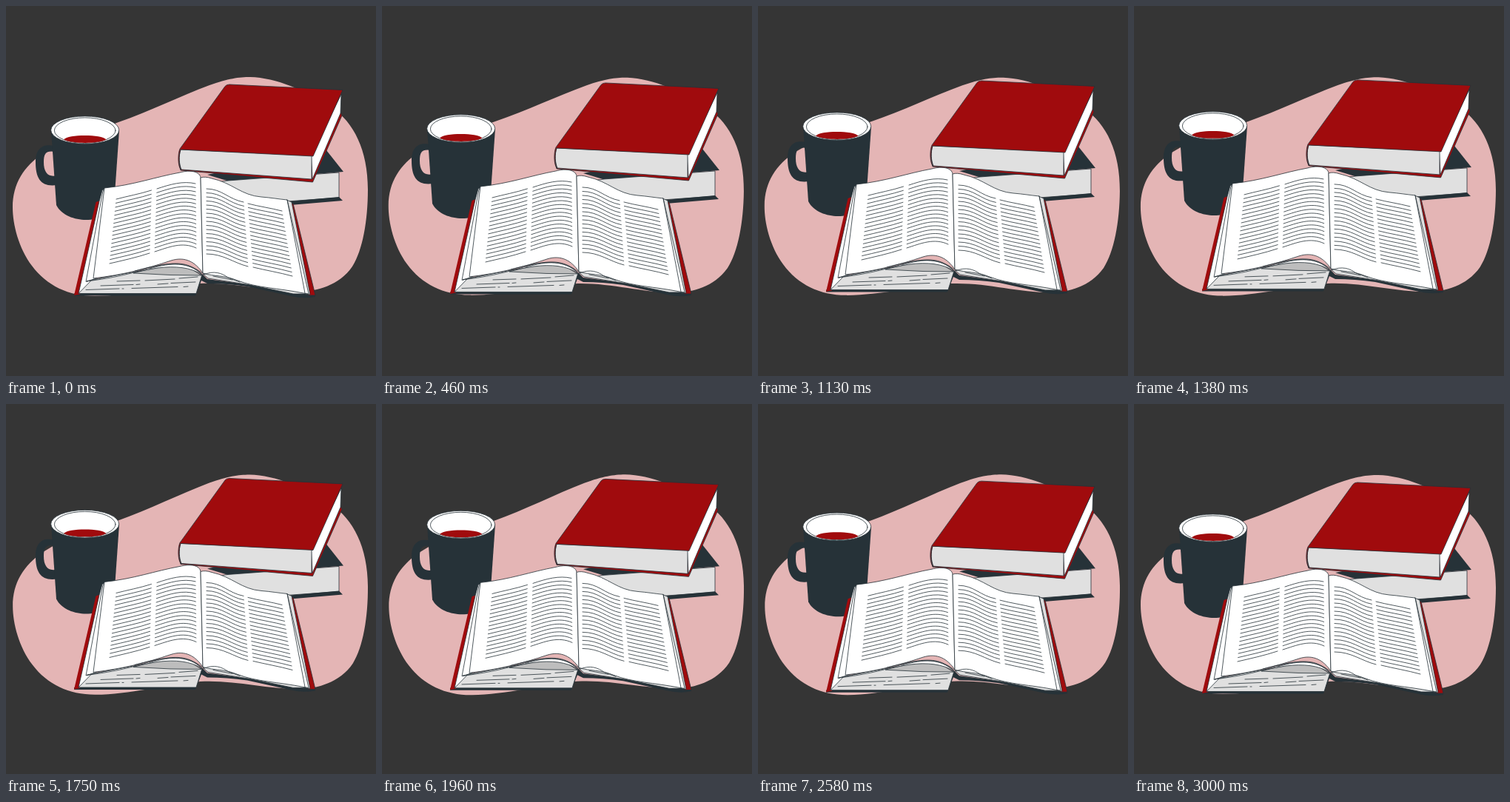
Animation of 500 by 500 pixels, one loop 3.04 s. Source, as an HTML page:

```html
<!DOCTYPE html>
<html lang="en">
<head>
<meta charset="utf-8">
<title>Books and coffee</title>
<style>
  html, body { margin: 0; width: 100%; height: 100%; overflow: hidden; background: #353535; }
  svg { display: block; width: 100vw; height: 100vh; }
  .dark { fill: #263238; }
  .red { fill: #a00b0d; }
  .grey { fill: #e0e0e0; }
  .shade { fill: #bdbdbd; }
  .white { fill: #fff; }
  .edge { stroke: #263238; stroke-width: .8; stroke-linejoin: round; }
  .line { fill: none; stroke: #263238; stroke-width: .8; stroke-linecap: round; }
</style>
</head>
<body>
<svg viewBox="0 0 500 500">
  <path id="blob" fill="#e4b5b5" d="M9 272C9 240 24 217 50 199C80 180 118 170 152 157C195 142 235 122 275 107C300 98 315 96 330 96C365 97 405 114 440 137C470 157 489 195 489 248C489 290 482 330 468 352C450 378 420 385 398 386C350 386 310 373 262 375C215 379 165 392 120 392C85 392 55 378 35 351C17 327 9 295 9 272Z"/>

  <g id="desk">
    <g id="mug">
      <path class="dark" fill-rule="evenodd" d="M67 190C55 186 40 188 40 211C40 234 48 245 69 242V229C57 232 51 225 51 211C51 198 55 195 67 197Z"/>
      <path class="dark" d="M61 168L68 269C75 283 93 289 108 289C125 289 142 281 146 268L153 168Z"/>
      <ellipse class="white edge" cx="106.7" cy="167.7" rx="46" ry="18.8"/>
      <ellipse class="line" cx="106.7" cy="168.2" rx="41.3" ry="17.3"/>
      <path class="red" d="M78 180.5C84 173.3 129 173.3 135.5 180.5C124 186.4 90 186.4 78 180.5Z"/>
    </g>

    <g id="lowerBook">
      <path class="dark" d="M272 228L433 195L456 224L300 236.5Z"/>
      <path class="grey edge" d="M284 238L300 236L450 225V259L380 264L300 268Z"/>
      <path class="dark" d="M372 265L450 258L455 263L384 269Z"/>
    </g>

    <g id="upperBook">
      <path class="red edge" d="M235 196L236 222L414.500 238L454 148L452 143L412 200Z"/>
      <path class="white edge" d="M412.500 203L453 119L452 145L414 234Z"/>
      <path class="grey edge" d="M236 194L413 202V234L237 221C234 214 233 203 236 194Z"/>
      <path class="red edge" d="M302 106L455 113.500L415 203L236 194C233 203 233.500 214 236.500 222C232 216 232 200 235 193L296 108.500Q298 106 302 106Z"/>
    </g>

    <g id="openBook">
      <path class="dark" d="M92 388.500L98 387L257 387L265 362L272 369L325 376L388 386L418 390V393Q402 396 385 392L326 379Q298 375 272 375L264 371L256 391.500L92 391.500Z"/>
      <path class="red" d="M121.500 265L127 263L100 389.500L92 391Z"/>
      <path class="red edge" d="M383 266L388 267L418 391L409 391Z"/>
      <path class="grey edge" d="M379 262L386 265L411 390L404 389Z"/>

      <path class="grey edge" d="M98 388.500L109 371L190 357L265 363L257 388.500Z"/>
      <path class="white edge" d="M126 264L130 249L134 247L118 368L98 388.500Z"/>
      <path class="white edge" d="M131 250L136 246L122 368L108 372.500Z"/>
      <path class="shade edge" d="M172 361C205 352 232 349 247 353L264 364L222 363.500Z"/>
      <path class="white edge" d="M109 372C165 365 184 356 210 350C237 345 251 349 265 363C249 353 229 351 205 354L172 359.500Z"/>
      <path class="white edge" d="M133 246C172 242 202 231 235 225C250 221 262 224 263 232L266 361C256 346 242 338 223 344C190 355 160 363 118 368Z"/>
      <path class="line" d="M174 358C205 350 240 340 265 361M194 355C225 346 246 346 264 362"/>

      <path class="grey edge" d="M266 362L285 359L316 371L404 387V389L388 389L330 377L273 368Z"/>
      <path class="white edge" d="M263 232Q269 230 278 233C306 239 318 256 345 258C358 259 369 261 380 262L409 389L402 388C367 381 339 381 313 371C293 363 283 366 266 361Z"/>
      <path class="line" d="M380 262L404 388M267 363C281 357 292 361 300 367L316 373M280 365L306 370"/>
      <path class="line" d="M150 372L181 371M188 371L228 369M234 368L259 366M128 378L172 376.500M176 376.500L181 376M205 376L219 375M223 374.500L256 373M108 383.500L153 382M157 382L159 382M170 381.500L232 379.500M240 379.500L246 379"/>
      <g id="text" class="line"></g>
    </g>
  </g>
</svg>
<script>
  const ROWS = 17;
  const LOOP = 3040, CYCLE = 3000, FPS = 24;
  const RISE = 6.67, TILT = 1;
  const byId = id => document.getElementById(id);
  const mix = (a, b, k) => a + (b - a) * k;

  // Each column: control points of its first and last line.
  const columns = [
    [[149, 261, 164, 257, 181, 254, 196.5, 249], [140, 348, 157, 344, 176, 340, 194, 334]],
    [[204, 247, 222, 241, 239, 236, 256, 240], [201, 332, 220, 326, 238, 318, 257, 327]],
    [[271, 247, 292, 247, 300, 261, 321, 265], [271, 335, 294, 335, 307, 347, 327, 352]],
    [[327, 267, 342, 271, 358, 273, 373, 277], [334, 353, 350, 357, 369, 360, 387, 365]]
  ];

  let d = "";
  for (const [top, bottom] of columns) {
    for (let row = 0; row < ROWS; row++) {
      const p = top.map((v, i) => mix(v, bottom[i], row / (ROWS - 1)).toFixed(1));
      d += `M${p[0]} ${p[1]}C${p.slice(2).join(" ")}`;
    }
  }
  byId("text").innerHTML = `<path d="${d}"/>`;

  // Triangle wave: 0 at the ends, 1 at a quarter, -1 at three quarters.
  const sway = k => k < .25 ? 4 * k : k < .75 ? 2 - 4 * k : 4 * k - 4;

  const start = performance.now();
  function draw(now) {
    const time = Math.max(0, now - start) % LOOP;
    const step = Math.floor((time + 10) * FPS / 1000);
    const k = Math.min(1, step * 1000 / FPS / CYCLE);
    const lift = RISE * (1 - Math.abs(1 - 2 * k));
    byId("desk").setAttribute("transform", `translate(0 ${-lift})`);
    byId("blob").setAttribute("transform", `rotate(${TILT * sway(k)} 249 244)`);
    requestAnimationFrame(draw);
  }
  draw(start);
</script>
</body>
</html>
```
